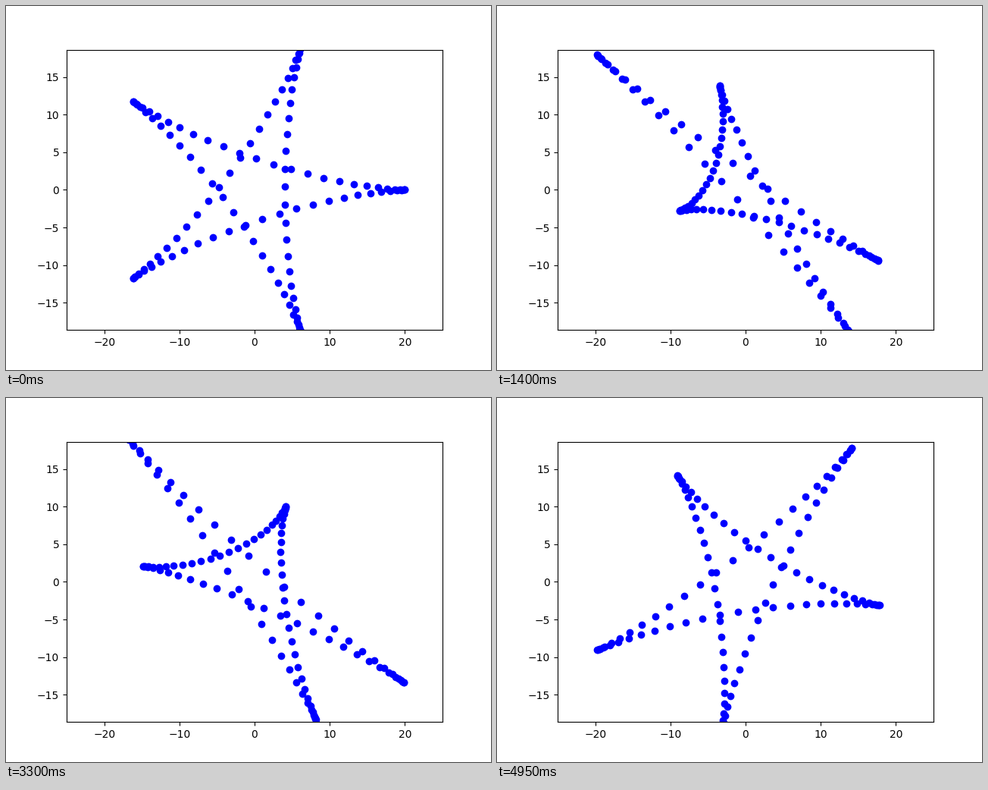
Write a matplotlib script that moves like this. It is 640 px wide and 480 px high and loops after 5 s.

```python
import numpy as np
import matplotlib.pyplot as plt
from matplotlib.animation import FuncAnimation

FRAMES = 100
INTERVAL = 50  # ms
HALF_WIDTH = 25

# Five-pointed hypocycloid: a circle of radius 8 rolling inside one of radius 20
t = np.arange(0, 4 * np.pi, 0.1)
star = np.array([
    12 * np.cos(t) + 8 * np.cos(1.5 * t),
    12 * np.sin(t) - 8 * np.sin(1.5 * t),
])

fig, ax = plt.subplots(figsize=(6.4, 4.8), dpi=100)
box = ax.get_window_extent()
half_height = HALF_WIDTH * box.height / box.width  # equal scale on both axes
ax.set_xlim(-HALF_WIDTH, HALF_WIDTH)
ax.set_ylim(-half_height, half_height)
dots, = ax.plot(*star, "bo")


def update(frame):
    # Both off-diagonal signs are negative, so the star shears as it turns
    a = np.radians(frame)
    c, s = np.cos(a), np.sin(a)
    dots.set_data(*(np.array([[c, -s], [-s, c]]) @ star))
    return dots,


anim = FuncAnimation(fig, update, frames=FRAMES, interval=INTERVAL,
                     repeat=True, repeat_delay=0)
plt.show()
```
